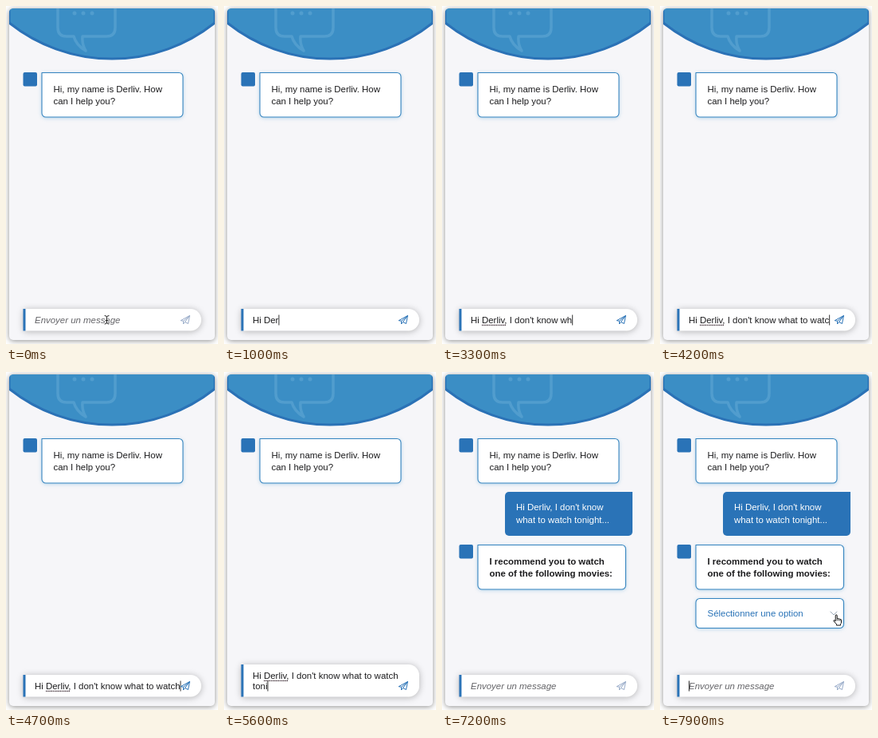
Write an HTML page with a canvas that moves like this. It is 266 by 423 pixels and loops after 8 s.

```html
<!DOCTYPE html>
<html lang="en">
<head>
<meta charset="utf-8">
<title>Chat assistant</title>
<style>
  html, body { margin: 0; width: 100%; height: 100%; overflow: hidden; background: #fff; }
  canvas { display: block; width: 266px; height: 423px; }
</style>
</head>
<body>
<canvas id="stage"></canvas>
<script>
const WIDTH = 266, HEIGHT = 423, LOOP = 8000;
const BLUE = '#2a73b7', INK = '#1c1c1e', PAPER = '#f6f6f9';
const FONT = '11.45px "Liberation Sans", Arial, sans-serif';
const BOT = 'Derliv';
const FIRST_LINE = `Hi ${BOT}, I don't know what to watch`;
const DRAFT = FIRST_LINE + ' tonight...';

// Loop events in ms
const FOCUS = 300, SENT = 6600, REPLY = 7000, SELECT = 7500, POINT = 7700;

// [time, characters typed], linear in between
const TYPING = [[400, 0], [1000, 6], [1100, 6], [1400, 9], [1500, 9], [1600, 10], [1700, 10],
  [2100, 14], [2200, 14], [2400, 16], [4200, 36], [4300, 37], [5500, 42], [5700, 42],
  [5800, 43], [6200, 43], [6400, 48]];

const canvas = document.getElementById('stage');
const ctx = canvas.getContext('2d');
const ratio = window.devicePixelRatio || 1;
canvas.width = WIDTH * ratio;
canvas.height = HEIGHT * ratio;

function typedCount(t) {
  if (t < TYPING[0][0]) return 0;
  for (let i = 1; i < TYPING.length; i++) {
    const [t0, n0] = TYPING[i - 1], [t1, n1] = TYPING[i];
    if (t < t1) return Math.floor(n0 + (n1 - n0) * (t - t0) / (t1 - t0) + 1e-6);
  }
  return DRAFT.length;
}

function box(x, y, w, h, radii, fill, shadow, border) {
  ctx.save();
  ctx.beginPath();
  ctx.roundRect(x, y, w, h, radii);
  if (shadow) {
    ctx.shadowColor = shadow.color;
    ctx.shadowBlur = shadow.blur * ratio;
    ctx.shadowOffsetY = (shadow.dy || 0) * ratio;
  }
  ctx.fillStyle = fill;
  ctx.fill();
  ctx.shadowColor = 'transparent';
  if (border) {
    ctx.strokeStyle = border;
    ctx.lineWidth = 1.1;
    ctx.stroke();
  }
  ctx.restore();
}

function text(str, x, y, color, style = '') {
  ctx.font = `${style} ${FONT}`;
  ctx.fillStyle = color;
  ctx.fillText(str, x, y);
  return ctx.measureText(str).width;
}

function stroke(path, color, width, fill) {
  const shape = new Path2D(path);
  if (fill) {
    ctx.fillStyle = fill;
    ctx.fill(shape);
  }
  ctx.strokeStyle = color;
  ctx.lineWidth = width;
  ctx.lineJoin = ctx.lineCap = 'round';
  ctx.stroke(shape);
}

function drawCard() {
  ctx.fillStyle = '#fff';
  ctx.fillRect(0, 0, WIDTH, HEIGHT);
  box(4, 3, 258, 415, 5, PAPER, { color: 'rgba(0,0,0,.45)', blur: 7, dy: 1 });
  ctx.save();
  ctx.beginPath();
  ctx.roundRect(4, 3, 258, 415, 5);
  ctx.clip();
  stroke('M4 0V21A207 207 0 0 0 262 21V0', '#2b72b6', 3, '#3b8ec5');
  stroke('M65 0V27Q65 38 76 38H85Q88 49 100 56Q95 48 96 38H126Q137 38 137 27V0', '#519dce', 3.5);
  ctx.fillStyle = '#519dce';
  for (const x of [86, 97, 108]) {
    ctx.beginPath();
    ctx.arc(x, 9, 2.5, 0, 7);
    ctx.fill();
  }
  ctx.restore();
}

function botBox(y, w, h, radii) {
  box(45, y, w, h, radii, '#fff', { color: 'rgba(60,150,205,.4)', blur: 5, dy: 1 }, '#3584bf');
}

function botMessage(y, w, lines, style) {
  box(21.5, y - 0.5, 17.5, 17.5, 2, BLUE);
  botBox(y, w, 55.5, [0, 5, 5, 5]);
  lines.forEach((line, i) => text(line, 59.5, y + 24 + i * 15.7, INK, style));
}

function drawConversation(t) {
  botMessage(83.5, 177, [`Hi, my name is ${BOT}. How`, 'can I help you?']);
  if (t >= SENT) {
    box(79, 150, 160, 55, [5, 0, 5, 5], BLUE);
    text(`Hi ${BOT}, I don't know`, 93, 173.3, '#fff');
    text('what to watch tonight...', 93, 189, '#fff');
  }
  if (t >= REPLY) {
    botMessage(216.5, 185.5, ['I recommend you to watch', 'one of the following movies:'], 'bold');
  }
  if (t >= SELECT) {
    botBox(283.5, 185.5, 37, 5);
    text('Sélectionner une option', 59.5, 306, BLUE);
    stroke('M214 300l4 4l4-4', '#9aa9b8', 1);
  }
}

function drawInput(t) {
  const count = t < SENT ? typedCount(t) : 0;
  const wrapped = count > FIRST_LINE.length + 1;
  const top = wrapped ? 366 : 379;
  box(22, top, 223, 406.5 - top, [2, 13.5, 13.5, 2], '#fff', { color: 'rgba(0,0,0,.28)', blur: 8, dy: 1 });
  ctx.fillStyle = BLUE;
  ctx.fillRect(21.5, top, 3, 406.5 - top);

  let caretX = 36;
  if (count === 0) {
    text('Envoyer un message', 36, 397, '#646468', 'italic');
  } else {
    const baseline = wrapped ? 384 : 397;
    caretX += text(DRAFT.slice(0, Math.min(count, FIRST_LINE.length)), 36, baseline, INK);
    if (count > 10) {
      const start = 36 + ctx.measureText('Hi ').width;
      const end = start + ctx.measureText(BOT).width;
      ctx.fillStyle = '#4a3a42';
      for (let x = start; x < end; x += 2.2) ctx.fillRect(x, baseline + 1.7, 1.4, 1.4);
    }
    if (wrapped) caretX = 36 + text(DRAFT.slice(FIRST_LINE.length + 1, count), 36, 397, INK);
  }
  const caretOn = t < SENT ? t >= FOCUS : (t - SENT) % 1000 < 500;
  if (caretOn) {
    ctx.fillStyle = '#333';
    ctx.fillRect(caretX, 386.5, 1, 13);
  }
  const plane = count ? BLUE : '#98abc9';
  stroke('M219.5 393.5L230.5 387.5L228.5 397.5L224.5 395.5L222.5 398V394.5ZM222.5 394.5L230.5 387.5L224.5 395.5', plane, 1);
}

function drawPointer(t) {
  ctx.save();
  if (t < TYPING[0][0] + 100) {
    const beam = 'M124 387.5Q126.5 387.5 126.5 389.5Q126.5 387.5 129 387.5M126.5 389.5V396M124 398Q126.5 398 126.5 396Q126.5 398 129 398M125 393.5H128';
    stroke(beam, '#fff', 2.4);
    stroke(beam, '#222', 1);
  } else if (t >= POINT) {
    const p = Math.min(1, (t - POINT) / 200);
    const rest = (1 - p) * (1 - p);
    ctx.translate(217 - 6 * rest, 303 + 10 * rest);
    stroke('M3.2 8.5V2Q3.2.8 4.2.8T5.2 2V5.6Q6.5 4.9 7.2 6Q8.5 5.3 9 6.5Q10.5 6 10.5 7.8V10Q10.5 11.5 9.5 12.5V14H4.5V12.5L1 8.8Q.6 7.6 1.7 7.6Z', '#111', 1, '#fff');
    stroke('M5.2 6V8M7.2 6.5V8M9 7V8.2', '#111', 0.8);
  }
  ctx.restore();
}

const began = performance.now();
function frame() {
  const t = (performance.now() - began) % LOOP;
  ctx.setTransform(ratio, 0, 0, ratio, 0, 0);
  drawCard();
  drawConversation(t);
  drawInput(t);
  drawPointer(t);
  requestAnimationFrame(frame);
}
frame();
</script>
</body>
</html>
```
